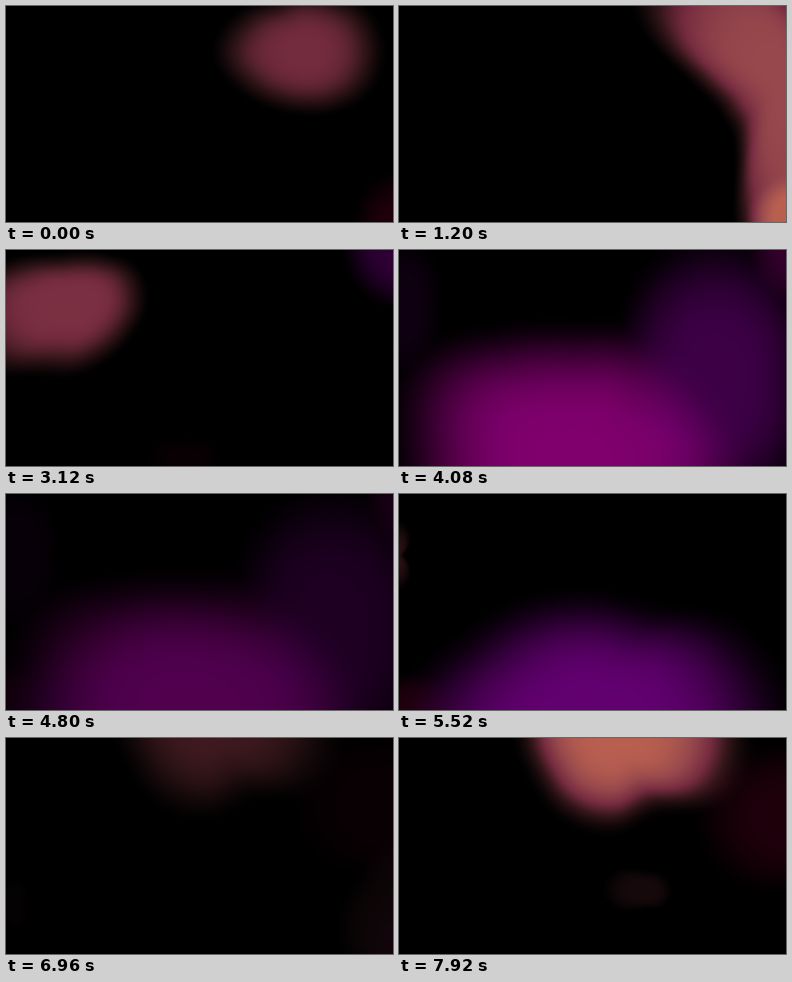
Write an HTML page with a canvas that moves like this. It is 600 px wide and 337 px high and loops after 8000 ms.

```html
<!DOCTYPE html>
<html lang="en">
<head>
<meta charset="utf-8">
<title>Drifting glow</title>
<style>
  html, body { margin: 0; width: 100%; height: 100%; overflow: hidden; background: #000; }
  canvas { display: block; width: 100%; height: 100%; }
</style>
</head>
<body>
<canvas id="stage" width="600" height="337"></canvas>
<script>
const W = 600, H = 337, LOOP = 8000, STEP = 240, TURN = 2 * Math.PI;
const ctx = document.getElementById('stage').getContext('2d');
const image = ctx.createImageData(W, H);

// Warm light runs through a ramp; the other tints simply scale.
const RAMP = [[0, 0, 0], [50, 21, 25], [118, 44, 64], [150, 72, 76], [184, 95, 80], [184, 95, 80]];
const TINTS = { violet: [98, 0, 112], magenta: [128, 0, 110], red: [60, 0, 22] };

const smooth = u => u * u * (3 - 2 * u);
const clamp = u => Math.max(0, Math.min(1, u));
const oval = (rx, ry) => [rx, ry, rx, ry];

// Smooth closed outline through radii spaced evenly clockwise from the right, one per degree.
function outline(radii) {
  const n = radii.length, at = i => radii[(i + n) % n];
  return Float32Array.from({ length: 361 }, (_, deg) => {
    const s = deg * n / 360, i = Math.floor(s), f = s - i;
    const a = at(i - 1), b = at(i), c = at(i + 1), d = at(i + 2);
    return b + f / 2 * (c - a + f * (2 * a - 5 * b + 4 * c - d + f * (3 * (b - c) + d - a)));
  });
}

// Each blob is brightest at its scene's time, and swells and fades around it.
const blobs = [];
function scene(time, rise, fall, vx, vy, add) {
  add((tint, x, y, power, radii, soft = 1) => {
    const edge = outline(radii);
    blobs.push({ time, rise, fall, vx, vy, tint, x, y, power, soft, edge, reach: Math.max(...edge) });
  });
}

scene(0, 1, 1200, -0.03, -0.02, blob => {
  blob('warm', 460, 72, 0.49, [134, 128, 113, 103, 106, 124, 147, 128, 104, 108, 115, 130]);
  blob('red', 612, 345, 0.5, oval(80, 95));
});
scene(1200, 1200, 1500, -0.1, -0.02, blob => {
  blob('warm', 600, 110, 0.75, [200, 250, 350, 420, 167, 123, 164, 290, 300, 170, 170, 180]);
  blob('warm', 612, 337, 0.85, oval(84, 88));
});
scene(3120, 1400, 960, -0.12, 0.01, blob => {
  blob('warm', 110, 82, 0.54, [115, 106, 106, 118, 138, 200, 220, 140, 94, 85, 95, 115]);
});
scene(3120, 500, 960, -0.04, 0.04, blob => {
  blob('violet', 615, -10, 0.48, oval(100, 110));
  blob('red', 275, 330, 0.14, oval(65, 42));
});
scene(4080, 960, 1440, 0.02, 0.01, blob => {
  blob('magenta', 270, 325, 1, [310, 310, 310, 310, 310, 310, 300, 320, 255, 228, 250, 265], 1.1);
  blob('violet', 490, 200, 0.62, oval(165, 240));
  blob('magenta', 620, 0, 0.4, oval(90, 100));
  blob('violet', 0, 90, 0.15, oval(70, 120));
});
scene(5520, 1440, 720, 0.03, 0.02, blob => {
  blob('violet', 300, 345, 1, [340, 340, 340, 340, 340, 340, 340, 265, 230, 212, 217, 295], 1.3);
  blob('red', 0, 342, 0.5, oval(120, 68));
  blob('warm', -8, 95, 0.2, oval(17, 60));
});
scene(6240, 720, 960, 0.03, 0.02, blob => {
  blob('warm', 568, 285, 0.42, [130, 100, 95, 90, 86, 86, 84, 90, 102, 150, 240, 190]);
  blob('violet', 592, 308, 0.28, oval(65, 75));
  blob('warm', -8, 245, 0.16, oval(17, 45));
});
scene(7920, 1500, 960, 0.02, 0.02, blob => {
  blob('warm', 330, -10, 1, [235, 225, 160, 172, 170, 160, 165, 165, 165, 165, 180, 220], 1.4);
  blob('red', 612, 125, 0.5, oval(165, 125));
});
scene(7920, 700, 960, 0.01, 0, blob => {
  blob('warm', 382, 238, 0.11, [44, 42, 36, 30, 38, 58, 72, 64, 44, 34, 38, 42]);
});

// Overlapping lights join as the root of summed squares, so they fuse without bright seams.
const warm = new Float32Array(W * H), red = new Float32Array(W * H), blue = new Float32Array(W * H);

function light(b, t) {
  const dt = t - b.time;
  const power = b.power * smooth(clamp(1 - Math.abs(dt) / (dt < 0 ? b.rise : b.fall)));
  if (power < 0.004) return;
  const cx = b.x + b.vx * dt, cy = b.y + b.vy * dt, tint = TINTS[b.tint];
  const x0 = Math.max(0, Math.floor(cx - b.reach)), x1 = Math.min(W, Math.ceil(cx + b.reach));
  const y0 = Math.max(0, Math.floor(cy - b.reach)), y1 = Math.min(H, Math.ceil(cy + b.reach));
  for (let y = y0; y < y1; y++) {
    for (let x = x0; x < x1; x++) {
      const dx = x - cx, dy = y - cy;
      const deg = (Math.atan2(dy, dx) / TURN + 1) % 1 * 360, k = Math.floor(deg);
      const r = b.edge[k] + (b.edge[k + 1] - b.edge[k]) * (deg - k);
      const u = 1 - (dx * dx + dy * dy) / (r * r);
      if (u <= 0) continue;
      const v = power * smooth(u) ** b.soft, i = y * W + x;
      if (tint) {
        red[i] += (v * tint[0]) ** 2;
        blue[i] += (v * tint[2]) ** 2;
      } else {
        warm[i] += v * v;
      }
    }
  }
}

function draw(t) {
  for (const field of [warm, red, blue]) field.fill(0);
  for (const b of blobs) light(b, t);
  const px = image.data;
  for (let i = 0; i < W * H; i++) {
    const v = Math.min(1, Math.sqrt(warm[i])) * 4, k = Math.floor(v), f = v - k;
    const lo = RAMP[k], hi = RAMP[k + 1];
    px[4 * i] = lo[0] + (hi[0] - lo[0]) * f + Math.sqrt(red[i]);
    px[4 * i + 1] = lo[1] + (hi[1] - lo[1]) * f;
    px[4 * i + 2] = lo[2] + (hi[2] - lo[2]) * f + Math.sqrt(blue[i]);
    px[4 * i + 3] = 255;
  }
  ctx.putImageData(image, 0, 0);
}

const start = performance.now();
let shown = -1;
function tick(now) {
  const t = Math.floor((Math.max(0, now - start) % LOOP) / STEP) * STEP;
  if (t !== shown) draw(shown = t);
  requestAnimationFrame(tick);
}
tick(start);
</script>
</body>
</html>
```
